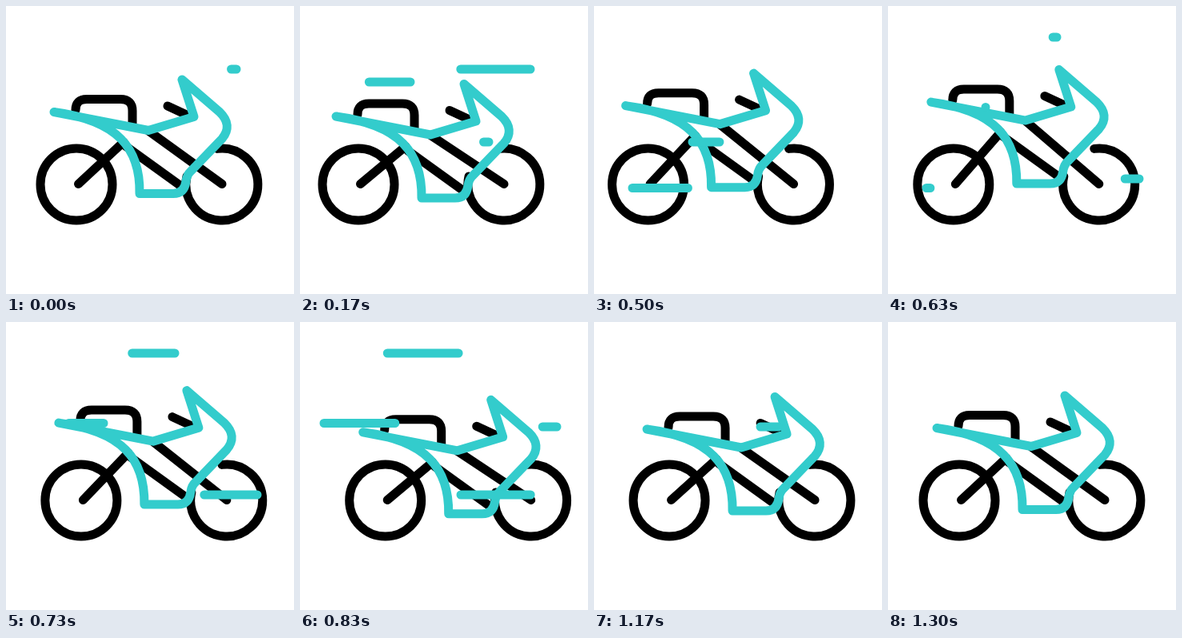
Write an HTML page that moves like this. It is 360 px wide and 360 px high and loops after 1670 ms.

```html
<!DOCTYPE html>
<html lang="en">
<head>
<meta charset="utf-8">
<title>Motorbike</title>
<style>
  html, body { margin: 0; height: 100%; overflow: hidden; background: #fff; }
  svg { display: block; width: 100vw; height: 100vh; }
</style>
</head>
<body>
<svg viewBox="0 0 360 360" fill="none" stroke="#000" stroke-width="11" stroke-linecap="round" stroke-linejoin="round">
  <g id="bike">
    <circle cx="88" cy="223" r="45"/>
    <path d="M264 178.4A45 45 0 1 1 226 213"/>
    <path id="links"/>
    <g id="body">
      <path d="M87 130Q87 116.5 101 116.5H143Q158 116.5 158 131V148M202 125L230 138M150 175.5L220 226"/>
      <path stroke="#33cccc" d="M60 132.5L178 155.5L235 138.5L220 92L267 132.5Q284 149 270 166L231 206.5Q226 211 225 219Q223 234.5 209 234.5H167C168 178 140 143 60 132.5Z"/>
    </g>
  </g>
  <path id="streaks" stroke="#33cccc"/>
</svg>
<script>
const LOOP = 1670, FPS = 30, LAST_STEP = 39;
const LENGTH = 113, TRAVEL = 7, TAIL_DELAY = 5.5, LEAD_IN = 0.4;

const byId = id => document.getElementById(id);
const clamp01 = v => Math.min(1, Math.max(0, v));

// Straight move between two values, bent by a sine arch
function leg(s, start, end, from, to, arch = 0) {
  const u = (s - start) / (end - start);
  return from + (to - from) * u + arch * Math.sin(Math.PI * u);
}

// Back, forward, then settle
function driftX(s) {
  if (s < 11) return leg(s, 0, 11, 0, -33);
  if (s < 25) return leg(s, 11, 25, -33, 18.7, -2.8);
  return leg(s, 25, LAST_STEP, 18.7, 1);
}

// Dip, hop, then settle
function bounceY(s) {
  if (s < 12.5) return leg(s, 0, 12.5, 0, 0, 5.8);
  if (s < 25) return leg(s, 12.5, 25, 0, 5.3, -15.2);
  return leg(s, 25, LAST_STEP, 5.3, 0);
}

// A line whose head runs left and whose tail follows later
function streak(s, right, y, start) {
  const age = s - start;
  if (age < -LEAD_IN || age >= TAIL_DELAY + TRAVEL) return '';
  const travelled = a => right - LENGTH * clamp01(a / TRAVEL);
  return `M${travelled(age)} ${y}H${travelled(age - TAIL_DELAY)}`;
}

// Streaks come in pairs, the second shifted in place and time
function wind(s) {
  let d = '';
  for (const k of [0, 1]) {
    d += streak(s, 288 - 52 * k, 79 + 91 * k, -0.4 + 5 * k);
    d += streak(s, 138 + 23 * k, 95 + 132.5 * k, 1.8 + 5 * k);
    d += streak(s, 314 + 7 * k, 216 - 85 * k, 17.9 + 6 * k);
    d += streak(s, 211 - 89 * k, 39 + 87.5 * k, 18.7 + 0.6 * k);
  }
  return d;
}

function draw(s) {
  const y = bounceY(s);
  byId('bike').setAttribute('transform', `translate(${driftX(s)} 0)`);
  byId('body').setAttribute('transform', `translate(0 ${y})`);
  byId('links').setAttribute('d', `M90.5 222.5L147 ${170 + y}M178 ${156 + y}L270 222.5`);
  byId('streaks').setAttribute('d', wind(s));
}

function tick() {
  const t = performance.now() % LOOP;
  draw(Math.min(LAST_STEP, Math.floor((t + 3.4) * FPS / 1000)));
  requestAnimationFrame(tick);
}
tick();
</script>
</body>
</html>
```
